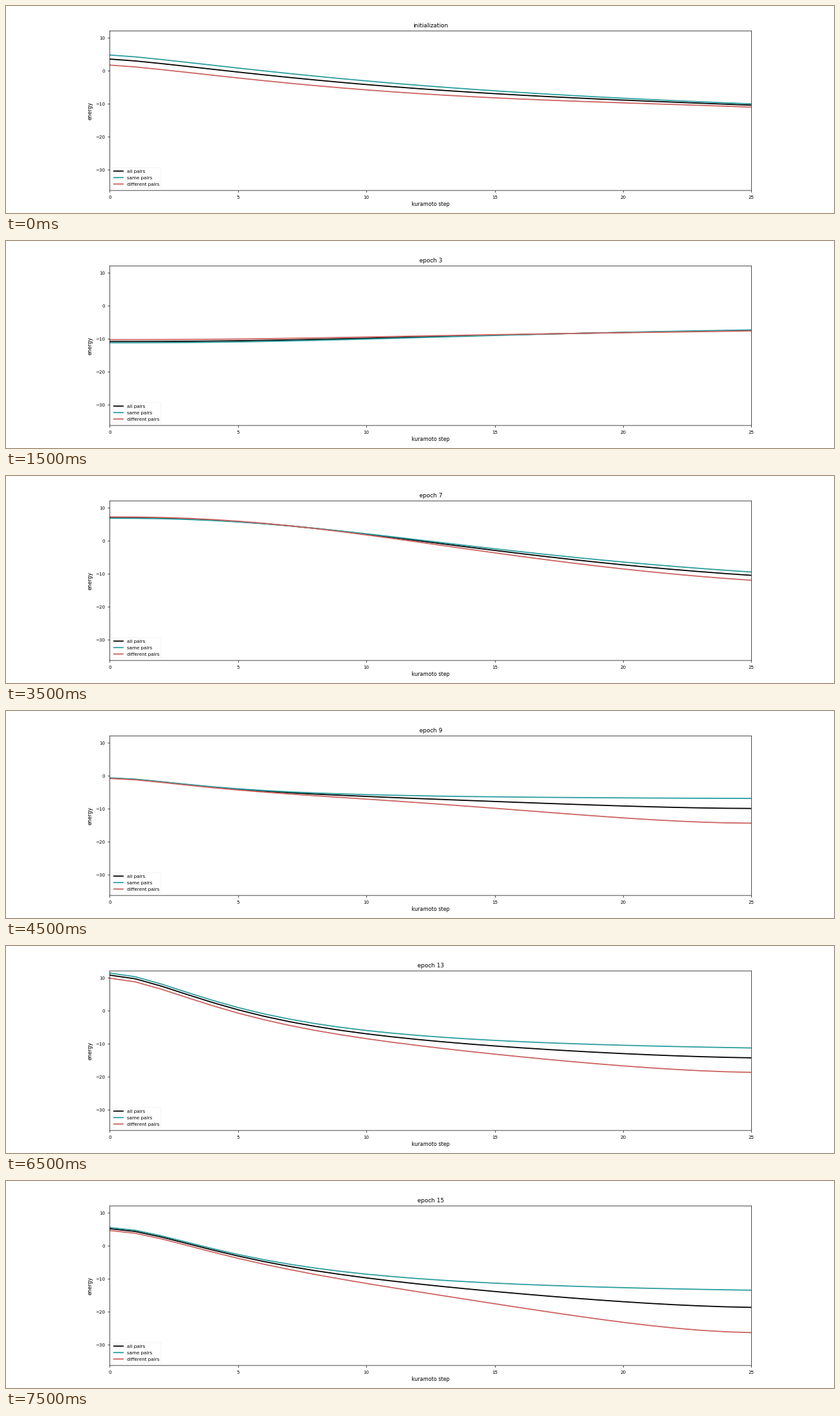
Animation of 1280 by 320 pixels, one loop 8 s. Source, as a matplotlib script:

```python
import numpy as np
import matplotlib.pyplot as plt
from matplotlib.animation import FuncAnimation

EPOCHS = 16
STEPS = np.arange(26)
SAME_SHARE = 0.595  # share of same-class pairs among all pairs

# epoch, energy of same pairs at first and last step, lead over different pairs
KEYS = np.array([
    (0, 4.8, -10.0, 3.05, 1.0),
    (1, -0.5, -11.6, 1.8, 0.7),
    (3, -11.2, -7.3, -0.95, 0.3),
    (5, 0.0, -3.7, -0.7, 1.4),
    (7, 6.85, -9.45, -0.4, 2.5),
    (8, 3.1, -9.5, 0.0, 6.8),
    (9, -0.6, -6.85, 0.2, 7.5),
    (11, 5.05, -9.8, 0.65, 8.25),
    (13, 11.45, -11.25, 1.55, 7.4),
    (15, 5.55, -13.45, 0.9, 12.85),
])


def shape(epoch):
    """Half-way point and power of the decay, lag of the gap."""
    if epoch == 0:
        return 0.7, 1.3, 1.5
    if epoch < 8:
        return 0.75, 2.3, 1.2
    return 0.2 + 0.01 * (epoch - 9), 1.7, 1.5


def decay(u, half, power):
    """Sigmoidal fall from 1 at u=0 to 0 at u=1."""
    def hill(v):
        return 1 / (1 + (v / half) ** power)
    return (hill(u) - hill(1)) / (1 - hill(1))


def smoothstep(u):
    return u * u * (3 - 2 * u)


def curves(epoch):
    start, end, gap0, gap1 = (np.interp(epoch, KEYS[:, 0], column)
                              for column in KEYS[:, 1:].T)
    half, power, lag = shape(epoch)
    u = STEPS / STEPS[-1]
    same = end + (start - end) * decay(u, half, power)
    diff = same - gap0 - (gap1 - gap0) * smoothstep(u ** lag)
    return SAME_SHARE * same + (1 - SAME_SHARE) * diff, same, diff


plt.rcParams.update({"font.family": "DejaVu Sans", "font.size": 8,
                     "axes.labelsize": 9, "axes.titlesize": 10,
                     "xtick.major.pad": 5, "ytick.major.pad": 5,
                     "path.snap": False})
fig, ax = plt.subplots(figsize=(20, 5), dpi=64)
fig.subplots_adjust(left=0.12525, right=0.90025, bottom=0.109, top=0.879)

lines = [ax.plot([], [], color=color, lw=2, label=label)[0]
         for label, color in (("all pairs", "black"),
                              ("same pairs", "#2a9d9f"),
                              ("different pairs", "#cb6260"))]
ax.set(xlim=(0, 25), ylim=(-36.25, 12.06), xticks=range(0, 26, 5),
       yticks=range(-30, 11, 10), xlabel="kuramoto step", ylabel="energy")
ax.legend(loc="lower left", edgecolor="0.94", labelspacing=0.56)
title = ax.set_title("initialization")


def update(epoch):
    for line, energy in zip(lines, curves(epoch)):
        line.set_data(STEPS, energy)
    title.set_text(f"epoch {epoch}" if epoch else "initialization")
    return [*lines, title]


anim = FuncAnimation(fig, update, frames=EPOCHS, interval=500,
                     repeat=True, repeat_delay=0, blit=False)
plt.show()
```
